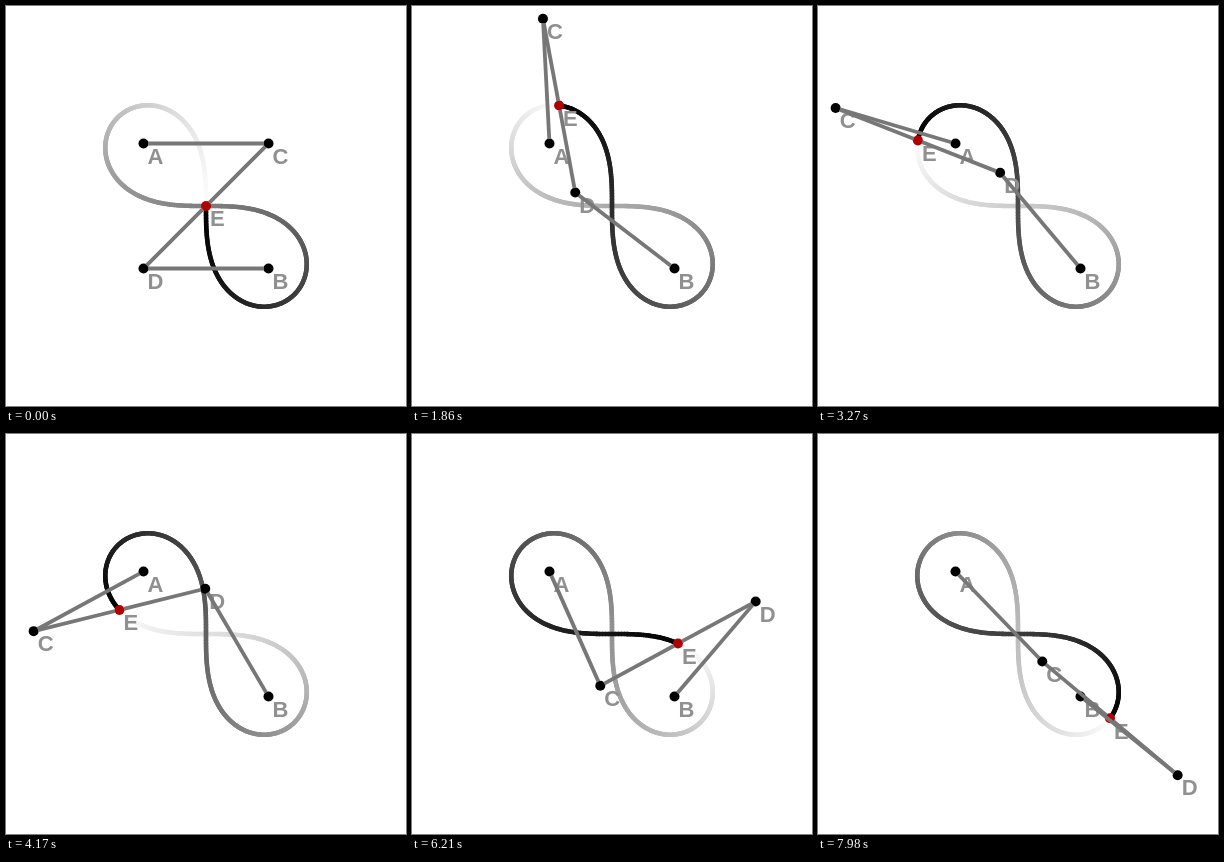
An HTML page that plays this animation: 400 by 400 pixels, repeating every 8000 ms.

```html
<!DOCTYPE html>
<html lang="en">
<head>
<meta charset="utf-8">
<title>Four-bar linkage tracing a lemniscate</title>
<style>
  html, body { margin: 0; width: 100%; height: 100%; overflow: hidden; background: #fff; }
  svg { display: block; width: 100%; height: 100%; }
  text { font: bold 22px "Liberation Sans", Arial, sans-serif; fill: #909090; }
  #trail { stroke-width: 4.6; stroke-linecap: round; }
  #bars { stroke: #777; stroke-width: 3.8; }
</style>
</head>
<body>
<svg viewBox="0 0 400 400">
  <g id="trail"></g>
  <g id="labels"></g>
  <g id="dots"></g>
  <g id="bars"></g>
</svg>
<script>
const LOOP = 8000, STEP = 30, CYCLE = 360, HALF = CYCLE / 2;
const ARM = 125, DOT = 5;
const A = [137.5, 137.5], B = [262.5, 262.5];

function add(parent, tag, attrs) {
  const el = document.createElementNS("http://www.w3.org/2000/svg", tag);
  set(el, attrs);
  document.getElementById(parent).append(el);
  return el;
}

function set(el, attrs) {
  for (const key in attrs) el.setAttribute(key, attrs[key]);
}

function polar([x, y], degrees) {
  const r = degrees * Math.PI / 180;
  return [x + ARM * Math.cos(r), y + ARM * Math.sin(r)];
}

const middle = (p, q) => [(p[0] + q[0]) / 2, (p[1] + q[1]) / 2];

// Mirror p across the perpendicular bisector of q and r.
function mirror(p, q, r) {
  const dx = r[0] - q[0], dy = r[1] - q[1], m = middle(q, r);
  const k = 2 * ((p[0] - m[0]) * dx + (p[1] - m[1]) * dy) / (dx * dx + dy * dy);
  return [p[0] - k * dx, p[1] - k * dy];
}

// The left crank drives the first half of the cycle, the right one the second.
function pose(step) {
  const n = ((step % CYCLE) + CYCLE) % CYCLE;
  let C, D;
  if (n < HALF) {
    C = polar(A, -1.5 * n);
    D = mirror(A, B, C);
  } else {
    D = polar(B, 1.5 * (n - HALF) - 90);
    C = mirror(B, A, D);
  }
  return { A, B, C, D, E: middle(C, D) };
}

const path = Array.from({ length: CYCLE }, (_, i) => pose(i).E);
const pathAt = i => path[((i % CYCLE) + CYCLE) % CYCLE];

// Oldest segment first, so newer ones lie on top.
const trail = Array.from({ length: CYCLE }, (_, i) => {
  const v = Math.round(255 * (CYCLE - 1 - i) / CYCLE);
  return add("trail", "line", { stroke: `rgb(${v},${v},${v})` });
});

const joints = [..."ABCDE"].map(name => {
  const label = add("labels", "text", {});
  label.textContent = name;
  const dot = add("dots", "circle", { r: DOT, fill: name === "E" ? "#b00000" : "#000" });
  return { name, label, dot };
});

const bars = ["AC", "CE", "ED", "DB"].map(ends => ({ ends, el: add("bars", "line", {}) }));

function setLine(el, p, q, inset = 0) {
  const dx = q[0] - p[0], dy = q[1] - p[1];
  const k = inset / (Math.hypot(dx, dy) || 1);
  set(el, {
    x1: p[0] + k * dx, y1: p[1] + k * dy,
    x2: q[0] - k * dx, y2: q[1] - k * dy
  });
}

function draw(time) {
  const step = Math.floor((time % LOOP) / STEP);
  const points = pose(step);
  trail.forEach((el, i) => {
    const at = step - CYCLE + i;
    setLine(el, pathAt(at), pathAt(at + 1));
  });
  for (const { name, label, dot } of joints) {
    const [x, y] = points[name];
    set(label, { x: x + 4, y: y + 20.2 });
    set(dot, { cx: x, cy: y });
  }
  // Bars stop at the rim of the joints they connect.
  for (const { ends, el } of bars) setLine(el, points[ends[0]], points[ends[1]], DOT - 0.5);
}

let start;
function tick(now) {
  start ??= now;
  draw(Math.max(0, now - start));
  requestAnimationFrame(tick);
}
draw(0);
requestAnimationFrame(tick);
</script>
</body>
</html>
```
